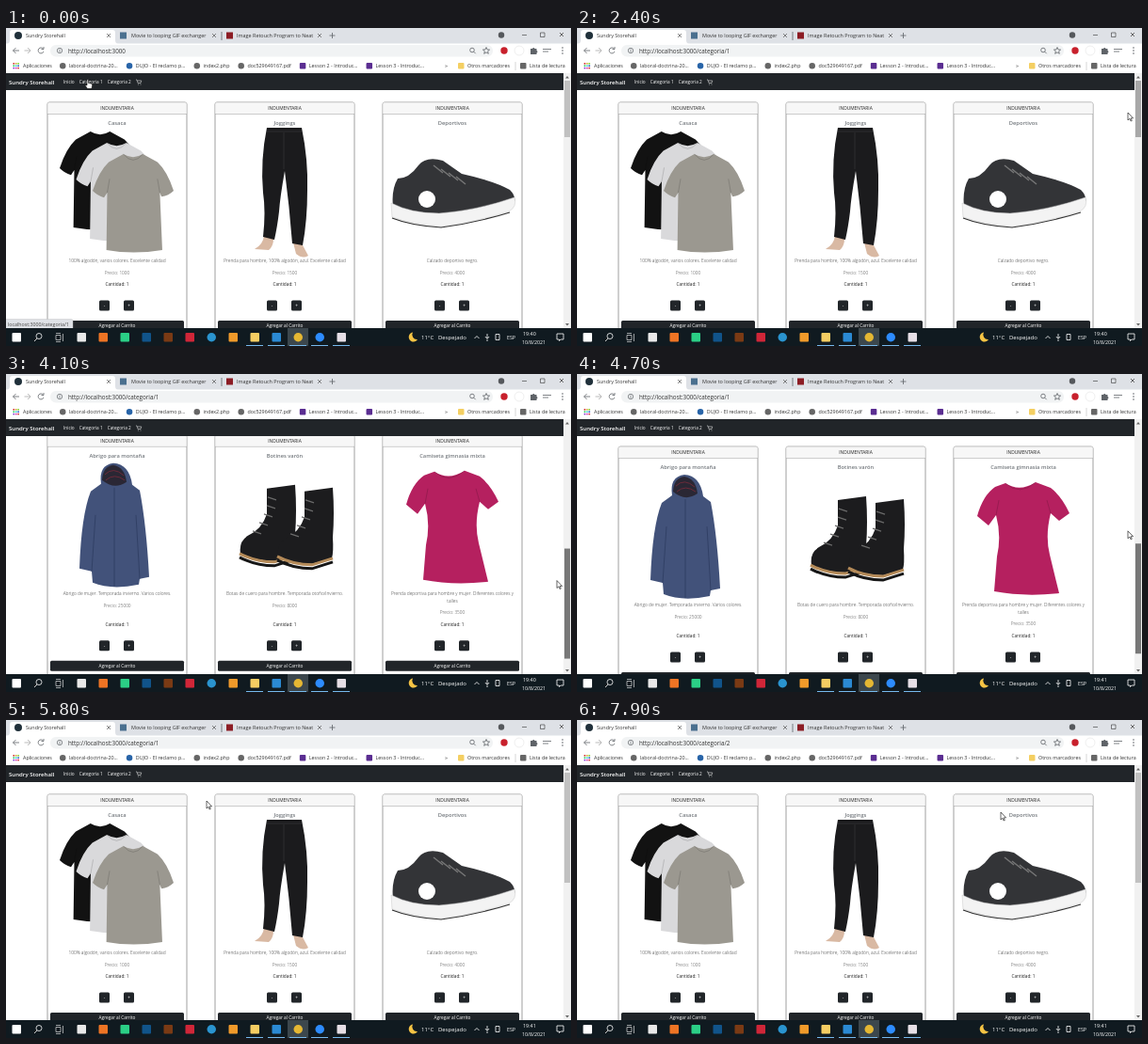
Write an HTML page that moves like this. It is 600 px wide and 338 px high and loops after 8000 ms.

```html
<!DOCTYPE html>
<html lang="es">
<head>
<meta charset="utf-8">
<style>
html, body { margin: 0; width: 100%; height: 100%; overflow: hidden; background: #fff }
svg { display: block; width: 600px; height: 338px }
text { font-family: "Open Sans", sans-serif; white-space: pre }
</style>
</head>
<body>
<script>
const rect = (x, y, w, h, fill, extra = '') =>
  `<rect x="${x}" y="${y}" width="${w}" height="${h}" fill="${fill}" ${extra}/>`;
const dot = (x, y, r, fill, extra = '') => `<circle cx="${x}" cy="${y}" r="${r}" fill="${fill}" ${extra}/>`;
const text = (x, y, size, str, fill = '#222', extra = '') =>
  `<text x="${x}" y="${y}" font-size="${size}" fill="${fill}" ${extra}>${str}</text>`;
const middle = (x, y, size, str, fill, extra = '') => text(x, y, size, str, fill, 'text-anchor="middle" ' + extra);
const shape = (d, fill, extra = '') => `<path d="${d}" fill="${fill}" ${extra}/>`;
const stroke = (d, color = '#5f6368', width = .8) => shape(d, 'none', `stroke="${color}" stroke-width="${width}"`);
const repeat = (n, make) => Array.from({ length: n }, (_, i) => make(i)).join('');

// Labels set one after another with an even gap
const ruler = document.createElement('canvas').getContext('2d');
const flow = (x, y, size, gap, labels, fill, icon = () => '') => labels.map((label, i) => {
  const item = icon(x, i) + text(x, y, size, label, fill);
  ruler.font = '100px "Open Sans", sans-serif';
  x += ruler.measureText(label).width * size / 100 + gap;
  return item;
}).join('');

// Product pictures
const tee = (x, y, fill) => `<g transform="translate(${x} ${y}) scale(.86 1.05)">` +
  shape('M38 1Q50 7 62 1L80 9Q92 18 100 38 94 43 85 44L83 40 86 98Q50 103 17 98L18 40 14 45Q6 43 0 38 8 18 20 9Z', fill) +
  stroke('M38 1Q50 13 62 1M83 40L80 26M18 40L21 26', '#0003') + '</g>';
const shirts = () => ['#121212', '#d9d9db', '#9b9890'].map((c, i) => tee(57 + 17.5 * i, 109 + 12 * i, c)).join('');

const trousers = () =>
  shape('M274 221L284 224Q284 232 279 236L264 235Q273 230 274 221ZM305 228L314 229 321 242Q315 246 308 240Z', '#d9b9a3') +
  shape('M277 106H314Q321 140 320 172 320 205 315 231L304 229Q301 190 296 152 291 180 290 195 288 212 285 225L273 222Q276 195 273 175 270 140 277 106Z', '#1b1b1d') +
  stroke('M277 110H314M295 111V150', '#343437');

const shoe = () =>
  shape('M411 190Q409 172 416 160 428 160 438 146 446 136 464 141L484 155Q520 163 535 172 543 180 539 188 500 200 460 203 430 200 411 190Z', '#333437') +
  repeat(4, i => stroke(`M${454 + 8 * i} ${146 + 4 * i}l10 8`, '#777', 1.5)) +
  shape('M409 186Q430 197 460 197 500 194 540 180 543 190 534 195 500 206 462 211 430 208 410 201Z', '#f3f3f3', 'stroke="#c9c9c9" stroke-width=".5"') +
  stroke('M410 202Q430 210 462 212 500 207 535 196', '#333', 1.2) +
  dot(447, 182, 9, '#fff');

const jacket = () =>
  shape('M101 117Q98 97 114 95 131 96 134 118L142 124Q149 160 152 216L142 218 141 224Q112 230 92 222L91 210 78 207Q80 150 90 125Z', '#42527a') +
  shape('M102 113Q103 98 114 97 126 99 128 115 115 124 102 113Z', '#2a2734') +
  stroke('M105 107Q114 98 125 108M106 113Q115 105 126 113', '#7c2b3b') +
  stroke('M115 121V226M95 150L91 210M138 150L142 218', '#2e3d61');

const boot = (x, y) => `<g transform="translate(${x} ${y})">` +
  shape('M30 1L60 -3Q62 25 60 50 61 66 59 72L38 78Q18 78 2 70 0 57 10 51 25 44 30 28Z', '#1c1c1e') +
  stroke('M1 70Q18 79 38 79L60 72', '#b48a58', 3) + stroke('M1 74Q18 83 38 83L60 76', '#161616', 3) +
  repeat(5, i => stroke(`M${31 - i * i} ${10 + 9 * i}l9 3`, '#6b6b6b', 1.2)) + '</g>';
const boots = () => boot(247, 121) + boot(287, 124);

const fittedTee = () =>
  shape('M455 104Q470 114 487 103L503 109Q515 118 523 136L512 144 503 136Q497 160 502 180L512 221Q475 225 443 219L446 182Q451 160 445 138L437 149 425 139Q431 117 444 108Z', '#b5205f') +
  stroke('M455 104Q470 118 487 103M503 136L499 122M445 138L448 122', '#0003');

// Catalogue
const button = (x, y, w, label) =>
  rect(x, y, w, 11, '#212529', 'rx="1.5"') + middle(x + w / 2, y + 7.2, 4.75, label, '#fff');

const card = (x, top, grow, shift, [title, about, price, picture]) => {
  const mid = x + 74, low = top + grow, lines = about.split('|');
  return rect(x, top, 148, 265 + grow, '#fff', 'rx="2" stroke="#777" stroke-width=".7"') +
    rect(x + .4, top + .4, 147.2, 12, '#f7f7f7') + stroke(`M${x} ${top + 12.5}h148`, '#999', .5) +
    middle(mid, top + 8.2, 4.85, 'INDUMENTARIA') +
    middle(mid, top + 23.8, 5.75, title, '#73787d', 'font-weight="600"') +
    `<g transform="translate(0 ${shift})">${picture()}</g>` +
    lines.map((line, i) => middle(mid, top + 170.3 + 7.5 * i, 4.85, line, '#333', 'font-weight="300"')).join('') +
    middle(mid, top + 175.4 + 7.5 * lines.length, 4.75, 'Precio: ' + price, '#444', 'font-weight="300"') +
    middle(mid, low + 195, 4.75, 'Cantidad: 1') +
    button(x + 55, low + 210.5, 11, '-') + button(x + 81, low + 210.5, 11, '+') +
    button(x + 3, low + 232, 142, 'Agregar al Carrito') + button(x + 3, low + 250.5, 142, 'Ver Detalles');
};

const cards = [[
  ['Casaca', '100% algodón, varios colores. Excelente calidad', 1000, shirts],
  ['Joggings', 'Prenda para hombre, 100% algodón, azul. Excelente calidad', 1500, trousers],
  ['Deportivos', 'Calzado deportivo negro.', 4000, shoe],
], [
  ['Abrigo para montaña', 'Abrigo de mujer. Temporada invierno. Varios colores.', 25000, jacket],
  ['Botines varón', 'Botas de cuero para hombre. Temporada otoño/invierno.', 8000, boots],
  ['Camiseta gimnasia mixta', 'Prenda deportiva para hombre y mujer. Diferentes colores y|talles', 3500, fittedTee],
]].map((row, r) => row.map((item, i) => card(44 + 178 * i, 79 + 285 * r, 8 * r, 299 * r, item)).join('')).join('');

// Browser frame
const cross = (x, y, color) => stroke(`M${x} ${y}l4 4m0-4l-4 4`, color, .7);
const tabTitles = ['Sundry Storehall', 'Movie to looping GIF exchanger', 'Image Retouch Program to Neat'];
const tabs = rect(0, 0, 600, 17, '#dee1e6') +
  shape('M0 17Q4 17 4 13V5Q4 2 7 2H113Q116 2 116 5V13Q116 17 120 17Z', '#fff') +
  tabTitles.map((title, i) => text(21 + 112 * i, 10.4, 5.45, title, '#333') + cross(107 + 112 * i, 6, '#555')).join('') +
  dot(13, 8, 4, '#20303a') + rect(121, 4.5, 7, 7, '#4a6f8f') + rect(234, 4.5, 7, 7, '#8c1c24') +
  stroke('M229 4v9M343.5 8h6m-3-3v6') + dot(526, 7.5, 3.2, '#55585c') +
  stroke('M548 7.5h5M567.500 5h4.500v4.500h-4.500z', '#333', .6) + cross(588, 5, '#333');

const toolbar = rect(0, 16.5, 600, 31.5, '#fff') + rect(47, 18, 470, 12.5, '#f1f3f4', 'rx="6"') +
  stroke('M14 24H7.5m3-3l-3 3 3 3M39.5 22a3 3 0 1 0 .5 3m0-5v2.5h-2.5') + stroke('M19.5 24H26m-3-3l3 3-3 3', '#aaa') +
  dot(57, 24, 2.7, 'none', 'stroke="#5f6368" stroke-width=".7"') + stroke('M57 23.5v2m0-3v.6') +
  dot(495, 23.5, 2.3, 'none', 'stroke="#5f6368" stroke-width=".8"') + stroke('M496.7 25.2l2 2') +
  stroke('M510 20.5l1 2.4 2.6.2-2 1.7.7 2.5-2.3-1.4-2.3 1.4.7-2.5-2-1.7 2.6-.2z') +
  dot(529, 24, 3.7, '#c8202c') + dot(545, 24, 5, '#fff', 'stroke="#e3e3e3" stroke-width=".6"') +
  shape('M557 22h2a1.3 1.3 0 0 1 2.5 0h2v2a1.3 1.3 0 0 1 0 2.5v1.5h-6.5z', '#5f6368') +
  stroke('M570 22.5h9M570 25h6') + repeat(3, i => dot(591, 21 + 3 * i, .8, '#5f6368'));

const bookmark = (colors, round) => (x, i) => rect(x - 10, 37, 6.5, 6.5, colors[i], `rx="${i < round ? 3.2 : 1}"`);
const bookmarks = repeat(9, i => rect(7.5 + 2.4 * (i % 3), 37 + 2.4 * Math.floor(i / 3), 1.6, 1.6, `hsl(${45 * i} 65% 50%)`)) +
  text(18, 41.8, 5.35, 'Aplicaciones', '#333') +
  flow(67, 41.8, 5.35, 19, ['laboral-doctrina-20...', 'DUJO - El reclamo p...', 'index2.php', 'doc529649167.pdf',
    'Lesson 2 - Introduc...', 'Lesson 3 - Introduc...'], '#333',
    bookmark(['#666', '#2864a8', '#666', '#666', '#5a2d91', '#5a2d91'], 4)) +
  text(466, 42, 6, '»', '#555') + stroke('M541 36v9', '#ccc') +
  flow(490, 41.8, 5.35, 21, ['Otros marcadores', 'Lista de lectura'], '#333', bookmark(['#f4cf62', '#666'], 0));

const navbar = rect(0, 48, 592, 18, '#212529') + text(3, 59.7, 6.05, 'Sundry Storehall', '#fff', 'font-weight="600"') +
  flow(61, 59.2, 4.72, 5, ['Inicio', 'Categoria 1', 'Categoria 2'], '#fff') +
  stroke('M138 55h1l1 3.5h3l.8-2.5h-4.3M140 60h1m1.500 0h1', '#ddd', .6);

// Desktop taskbar: plain icons 23 px apart, the last five belong to open programs
const icons = ['#fff', '', '', '#e9e9e9', '#ee7424', '#2bcf86', '#11548a', '#7a3a14', '#d02638',
  '#2a94cf', '#f09a2a', '#f5cd62', '#2b8ad4', '#e5b733', '#2d8cff', '#e6dfe6'];
const taskbar = rect(0, 319, 600, 19, '#101a20') + rect(299, 319, 22, 19, '#3c474d') +
  icons.map((c, i) => (c && rect(6.5 + 23 * i, 324, 9.5, 9.5, c, `rx="${/2a94cf|e5b733|2d8cff/.test(c) ? 5 : 1}"`)) +
    (i > 10 ? rect(2 + 23 * i, 337, 18, 1, '#76b9ed') : '')).join('') +
  dot(35, 327.5, 3, 'none', 'stroke="#fff" stroke-width=".8"') + stroke('M33 330l-3 3', '#fff') +
  stroke('M53 326.5h5v5h-5zM53 324.5h5M53 333.5h5M60.5 325v8', '#ddd', .7) +
  shape('M432 323.5A5 5 0 1 0 437 331 5 5 0 0 1 432 323.5Z', '#f5c344') +
  text(441, 331, 6, '11°C', '#fff') + text(459, 331, 6, 'Despejado', '#fff') +
  stroke('M497.5 330l2.5-2.5 2.5 2.5M511 325v5m-2-2q2 4 4 0m-2 3v2M520 325.5h4v6h-4zM585 325h7v6h-3l-1.5 1.5v-1.5h-2.5z', '#fff') +
  text(532, 331, 5.3, 'ESP', '#fff') + text(548, 335.5, 5.3, '10/8/2021', '#fff');

const outline = 'stroke="#000" stroke-width=".6"';
const arrow = shape('M0 0V8L1.9 6.3 3.1 9 4.3 8.5 3.1 5.9H5.6Z', '#fff', 'id="arrow" ' + outline);
const hand = shape('M0 0Q1 -1 1.6 0V3.5L5 4.2Q6 4.6 5.7 6L5 9.5H.5L-2 6Q-2.3 4.8 0 6Z', '#fff', 'id="hand" ' + outline);

document.body.innerHTML = `<svg viewBox="0 0 600 338">
  <clipPath id="view"><rect y="48" width="592" height="271"/></clipPath>
  <g clip-path="url(#view)"><g id="page">${cards}</g></g>${navbar}
  ${rect(592, 48, 8, 271, '#f1f1f1')}${shape('M594 53.5l2-2.5 2 2.5zM594 314l2 2.5 2-2.5z', '#666')}
  ${rect(593, 56, 6, 117, '#c1c1c1', 'id="thumb"')}
  <g id="status">${rect(-2, 309.5, 73, 11, '#dee1e6', 'rx="1.5" stroke="#bbb" stroke-width=".4"')}${text(2, 316.5, 5.25, '', '#444', 'id="link"')}</g>
  ${tabs}${toolbar}${bookmarks}${text(66, 26.7, 6.3, '', '#333', 'id="url"')}
  ${taskbar}${text(549, 327, 5.4, '', '#fff', 'id="clock"')}
  <g id="cursor">${arrow}${hand}</g></svg>`;

const el = id => document.getElementById(id);
const place = (id, x, y) => el(id).setAttribute('transform', `translate(${x} ${y})`);
const show = (id, on) => el(id).style.display = on ? '' : 'none';

function draw(now) {
  const t = Math.floor(now % 8000 / 100) * 100;
  const ramp = (from, to) => Math.min(1, Math.max(0, (t - from) / (to - from)));
  const settle = (from, to) => 1 - (1 - ramp(from, to)) ** 3;

  // The pointer drags the scrollbar down in two pulls, then up ahead of the page
  const pulled = 70 * ramp(3000, 3200) + 238 * settle(3500, 4400);
  const scroll = pulled * (1 - ramp(4500, 5200) ** 2.14);
  const toBar = settle(1000, 1800), up = ramp(4500, 5000), away = ramp(5300, 5800);
  const toLink = ramp(5900, 6500), leave = ramp(7600, 7900), thumbRatio = .433;
  const overLink = t < 1100 || t >= 6500 && t < 7700;
  const category = t < 400 ? 0 : t < 6800 ? 1 : 2;

  place('page', 0, -scroll);
  place('cursor', 86 + 499 * toBar - 372 * away - 95 * toLink + 332 * leave,
    55 + 35 * toBar + thumbRatio * pulled * (1 - up) - 8 * up + 4 * away - 31 * toLink + 43 * leave);
  place('thumb', 0, scroll * thumbRatio);
  el('thumb').setAttribute('height', t < 2600 ? 60 : 117); // the filtered list is shorter
  el('thumb').setAttribute('fill', t < 1800 || t >= 5300 ? '#c1c1c1' : t < 3100 ? '#a8a8a8' : '#787878');
  show('arrow', !overLink);
  show('hand', overLink);
  show('status', overLink);
  el('link').textContent = 'localhost:3000/categoria/' + (t < 4000 ? 1 : 2);
  el('url').textContent = 'http://localhost:3000' + (category ? '/categoria/' + category : '');
  el('clock').textContent = t < 4600 ? '19:40' : '19:41';
  requestAnimationFrame(draw);
}
draw(0);
</script>
</body>
</html>
```
